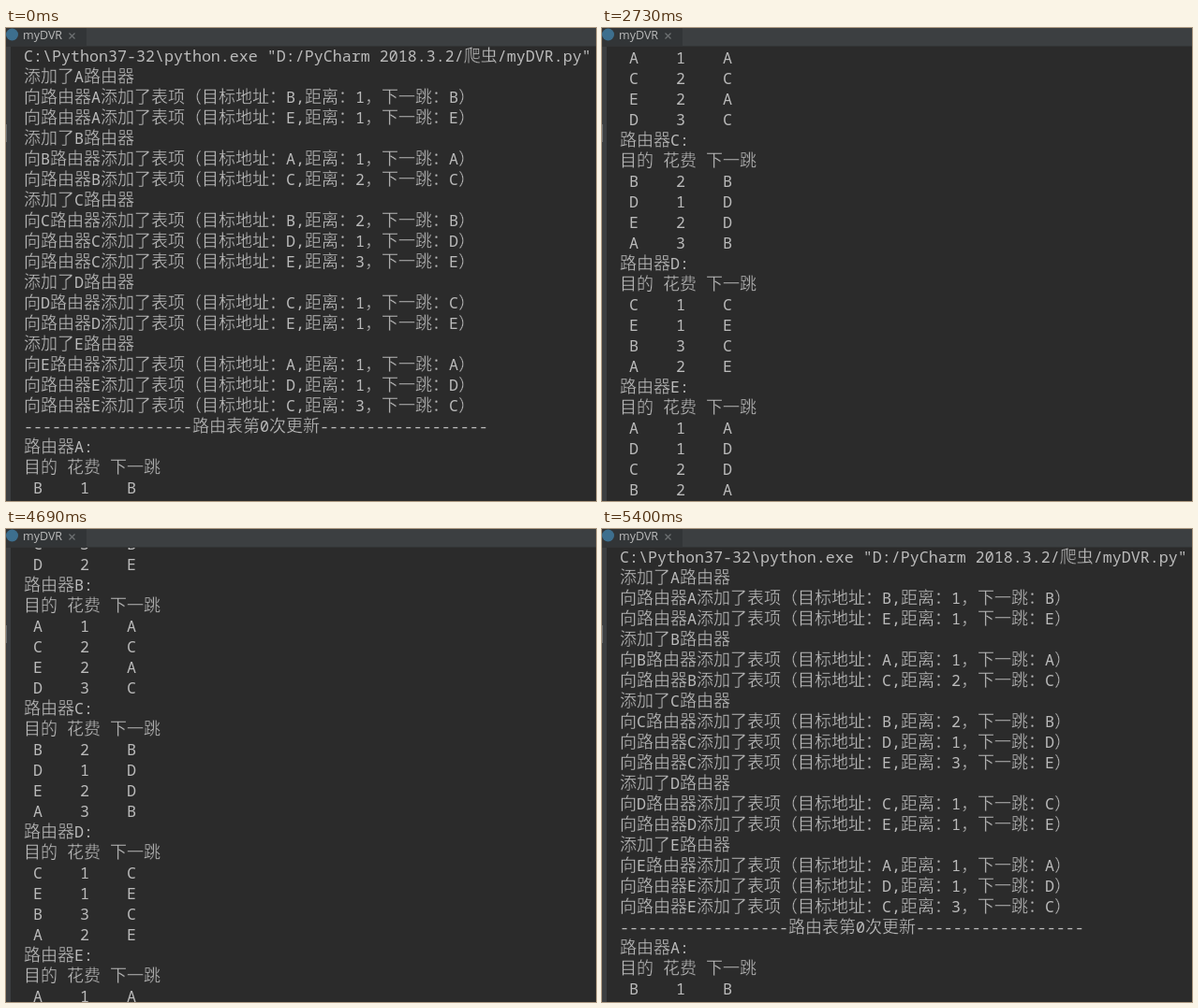
Recreate the animation shown at these times as an HTML page. Size 630 by 506 pixels, loop 8 s.

```html
<!DOCTYPE html>
<html lang="zh-CN">
<head>
<meta charset="utf-8">
<title>myDVR</title>
<style>
  html, body { margin: 0; width: 100%; height: 100%; overflow: hidden; background: #2b2b2b; }
  svg { display: block; width: 630px; height: 506px; }
  #log text { fill: #bbb; white-space: pre; }
  .mono { font: 16.667px "Noto Sans Mono", "DejaVu Sans Mono", monospace; }
  /* The background-coloured edge thins the strokes. */
  .han { font: 300 18px "Noto Sans CJK SC", "Noto Sans CJK", sans-serif; stroke: #2b2b2b; stroke-width: .3px; }
  .tab { font: 12.5px "Open Sans", "Noto Sans", sans-serif; fill: #bbb; }
</style>
</head>
<body>
<svg viewBox="0 0 630 506">
  <defs><clipPath id="pane"><rect x="5" y="20" width="625" height="486"/></clipPath></defs>
  <rect width="630" height="506" fill="#2b2b2b"/>
  <rect width="5" height="506" fill="#3c3f41"/>
  <rect y="103" width="1" height="19" fill="#6b6e70"/>
  <g clip-path="url(#pane)"><g id="log"></g></g>
  <rect width="630" height="20" fill="#3c3f41"/>
  <rect width="86" height="20" fill="#323537"/>
  <rect y="19" width="630" height="1" fill="#323435"/>
  <circle id="icon" cx="6.5" cy="7" r="6.5"/>
  <circle id="dot" cx="12" cy="13" r="2.6" fill="#3fc53f"/>
  <text class="tab" x="18" y="12">myDVR</text>
  <path d="M67.5 5.5l6 6m0-6l-6 6" stroke="#6e7173" stroke-width="1.2"/>
</svg>
<script>
const LOOP = 8000, LINE = 22, BASE = 36;
const NS = 'http://www.w3.org/2000/svg';
const $ = id => document.getElementById(id);

// Each entry reads: destination, cost, next hop.
const links = { A: 'B1B E1E', B: 'A1A C2C', C: 'B2B D1D E3E', D: 'C1C E1E', E: 'A1A D1D C3C' };
const routes = {
  A: 'B1B E1E C3B D2E', B: 'A1A C2C E2A D3C', C: 'B2B D1D E2D A3B',
  D: 'C1C E1E B3C A2E', E: 'A1A D1D C2D B2A'
};

function setup() {
  return Object.entries(links).flatMap(([name, list]) => [
    `添加了${name}路由器`,
    ...list.split(' ').map(([to, cost, hop], i) => {
      const who = i === 0 && name !== 'A' ? `${name}路由器` : `路由器${name}`;
      return `向${who}添加了表项（目标地址：${to},距离：${cost}，下一跳：${hop}）`;
    })
  ]);
}

function report(round, tables) {
  const dashes = '-'.repeat(18);
  return [
    `${dashes}路由表第${round}次更新${dashes}`,
    ...Object.entries(tables).flatMap(([name, list]) => [
      `路由器${name}:`,
      '目的 花费 下一跳',
      ...list.split(' ').map(([to, cost, hop]) => ` ${to}    ${cost}    ${hop}`)
    ])
  ];
}

const lines = [
  'C:\\Python37-32\\python.exe "D:/PyCharm 2018.3.2/爬虫/myDVR.py"',
  ...setup(), ...report(0, links), ...report(1, routes), ...report(2, routes),
  '', 'Process finished with exit code 0'
];

function add(parent, tag, attrs, content = '') {
  const el = document.createElementNS(NS, tag);
  for (const key in attrs) el.setAttribute(key, attrs[key]);
  el.textContent = content;
  return parent.appendChild(el);
}

const rows = lines.map((line, i) => {
  const row = add($('log'), 'text', { x: 19, y: BASE + i * LINE });
  for (const run of line.match(/[\x20-\x7e]+|[^\x20-\x7e]+/g) || [])
    add(row, 'tspan', { class: run.charCodeAt(0) < 127 ? 'mono' : 'han' }, run);
  return row;
});

// Start time, number of printed lines, scroll offset.
const prints = [
  [0, 105, 0], [500, 1, 0], [930, 22, 0], [990, 41, 416], [1920, 52, 661],
  [1980, 72, 1098], [2910, 81, 1296], [2970, 103, 1780], [3030, 105, 1824]
];

function hermite(u, from, to, v0, v1) {
  const a = u * u * (3 - 2 * u);
  return from + (to - from) * a + v0 * u * (1 - u) ** 2 - v1 * u * u * (1 - u);
}

// The view is dragged back to the top in short steps.
function dragged(t) {
  const step = Math.min(18, Math.floor((t - 4328) / 59.2));
  return Math.round(step < 12
    ? hermite(step / 12, 1750, 331, -95 * 12, -85 * 12)
    : hermite((step - 12) / 6, 331, 0, -85 * 6, -25 * 6));
}

function draw(t) {
  let [, count, scroll] = prints.filter(p => p[0] <= t).pop();
  if (t >= 4330) scroll = dragged(t);
  rows.forEach((row, i) => row.style.display = i < count ? '' : 'none');
  $('log').setAttribute('transform', `translate(0 ${-scroll})`);
  const running = t >= 500 && t < 2730;
  $('icon').setAttribute('fill', running ? '#3f93c4' : '#3d6f8e');
  $('dot').style.display = running ? '' : 'none';
}

const start = performance.now();
function tick() {
  draw((performance.now() - start) % LOOP);
  requestAnimationFrame(tick);
}
tick();
</script>
</body>
</html>
```
